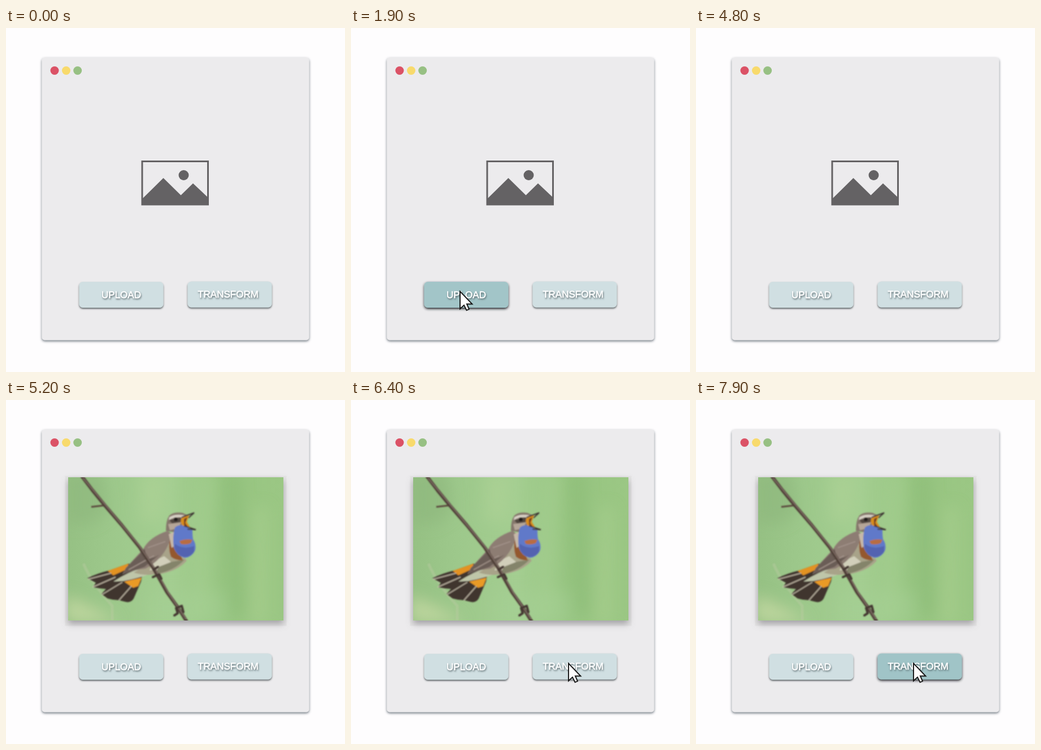
Animation of 600x610 px, one loop 8000 ms. Source, as an HTML page:

```html
<!DOCTYPE html>
<html lang="en">
<head>
<meta charset="utf-8">
<title>Upload and transform</title>
<style>
html, body { margin: 0; width: 100%; height: 100%; overflow: hidden; background: #fefdfe; }
svg { display: block; width: 100vw; height: 100vh; }
text { font: 17px "Liberation Sans", Arial, sans-serif; fill: #fff; stroke: #fff; stroke-width: .4; text-anchor: middle; }
</style>
</head>
<body>
<svg viewBox="0 0 600 610">
  <defs>
    <filter id="winShadow" x="-5%" y="-5%" width="110%" height="110%">
      <feDropShadow dx="0" dy="2" stdDeviation="2" flood-color="#667078" flood-opacity=".95"/>
    </filter>
    <filter id="btnShadow" x="-10%" y="-20%" width="120%" height="150%">
      <feDropShadow dx="0" dy="2" stdDeviation="1.7" flood-color="#50565c" flood-opacity=".9"/>
    </filter>
    <filter id="pressShadow" x="-10%" y="-20%" width="120%" height="150%">
      <feDropShadow dx="0" dy="2.2" stdDeviation="2" flood-color="#1c2226"/>
    </filter>
    <filter id="textShadow" x="-10%" y="-40%" width="120%" height="200%">
      <feDropShadow dx="1" dy="2" stdDeviation="1.5" flood-color="#46545a" flood-opacity=".9"/>
    </filter>
    <filter id="cardShadow" x="-10%" y="-10%" width="120%" height="120%">
      <feDropShadow dx="0" dy="6" stdDeviation="6" flood-color="#77757a" flood-opacity=".6"/>
    </filter>
    <filter id="soft" x="-60%" y="-30%" width="220%" height="160%"><feGaussianBlur stdDeviation="13"/></filter>
    <filter id="feather" x="-10%" y="-10%" width="120%" height="120%"><feGaussianBlur stdDeviation=".8"/></filter>
    <linearGradient id="meadow">
      <stop offset="0" stop-color="#96c184"/>
      <stop offset=".2" stop-color="#9dc88b"/>
      <stop offset=".48" stop-color="#a4ce91"/>
      <stop offset=".72" stop-color="#97c581"/>
      <stop offset="1" stop-color="#9bc784"/>
    </linearGradient>
    <clipPath id="frame"><rect x="110" y="137" width="381" height="254"/></clipPath>
  </defs>

  <rect width="600" height="610" fill="#fefdfe"/>
  <rect x="63.5" y="52.5" width="473" height="501" rx="5" fill="#ecebed" filter="url(#winShadow)"/>
  <circle cx="86" cy="75.5" r="7.5" fill="#db5266"/>
  <circle cx="106.5" cy="75.5" r="7.5" fill="#f8da6c"/>
  <circle cx="126.7" cy="75.5" r="7.5" fill="#97c083"/>

  <g fill="#646264">
    <rect x="241" y="236.5" width="116.5" height="76.5" fill="#ecebed" stroke="#646264" stroke-width="3"/>
    <circle cx="314.5" cy="261" r="9"/>
    <path d="M241 303L278.5 266L309.5 296.5L331 275.5L358 301V313H241z"/>
  </g>

  <g id="photo">
    <rect x="104.5" y="134.5" width="392" height="266" fill="#e1e0e2" opacity=".7"/>
    <rect x="110" y="137" width="381" height="254" fill="#a3ce8e" filter="url(#cardShadow)"/>
    <g clip-path="url(#frame)">
      <rect x="110" y="137" width="381" height="254" fill="url(#meadow)"/>
      <g filter="url(#soft)">
        <path d="M105 130h65l10 70l-30 20h-45z" fill="#8bb47a" opacity=".5"/>
        <path d="M235 130h50l-8 85h-40z" fill="#b2d497" opacity=".5"/>
        <path d="M345 130h22l-12 260h-22z" fill="#aed49c" opacity=".35"/>
        <path d="M390 130h24l8 250h-26z" fill="#86b671" opacity=".45"/>
        <path d="M440 190h24v210h-34z" fill="#aed193" opacity=".45"/>
        <path d="M250 340h140v60h-140z" fill="#a6cf93" opacity=".5"/>
        <path d="M105 345L160 370L200 395H105z" fill="#c2d7a2" opacity=".85"/>
      </g>
      <path d="M137 290Q152 325 188 365V391" fill="none" stroke="#b9cba1" stroke-width="5" opacity=".45" filter="url(#feather)"/>

      <g filter="url(#feather)">
        <path d="M144 316Q162 307 184 302L217 290L242 304L239 322L226 352Q221 360 212 358L200 355L189 354L180 352L169 344L177 335L166 334L154 332L159 324z" fill="#40342f"/>
        <path d="M180 303L217 290L214 300L190 311z" fill="#e39222"/>
        <path d="M209 322L240 315L234 330L225 333z" fill="#e99a27"/>
        <path d="M145 318L186 307M153 332L194 314M170 345L206 323M200 355L222 330" stroke="#d0c8b4" stroke-width="2" opacity=".8"/>
        <path d="M190 322Q214 306 250 293L270 303Q237 316 208 321z" fill="#bfc6a9"/>

        <path d="M282 236Q296 245 306 277Q322 281 319 286Q304 302 276 308Q246 313 226 306Q254 291 262 270z" fill="#a8a389"/>
        <path d="M262 285L280 277L292 287L274 301L254 302z" fill="#d1cfba"/>
        <path d="M270 296L293 287L316 283Q298 303 264 309z" fill="#84846a"/>
        <path d="M286 232Q254 243 243 264L212 298L206 309Q231 300 247 299Q275 284 287 257L297 240z" fill="#8d7d73"/>
        <path d="M246 264L212 298L207 309L245 296L272 274Q258 283 246 279z" fill="#6b5d56"/>
        <path d="M217 301L262 276M251 262L282 251" fill="none" stroke="#a5968c" stroke-width="1.5"/>
        <path d="M291 243Q286 262 292 278Q301 285 313 284L303 262z" fill="#94582f"/>
        <path d="M288 238L299 233L301 258L293 262z" fill="#c6b8a7"/>

        <path d="M283 232Q283 213 289 205Q297 198 312 200L321 204L315 223L302 235z" fill="#85776c"/>
        <path d="M289 208Q300 201 317 205L309 208Q298 207 288 213z" fill="#d9d2c7"/>
        <path d="M289 213L309 208L311 216L294 219z" fill="#51463f"/>
        <circle cx="300.5" cy="211.5" r="3.5" fill="#211d1d"/>
        <path d="M287 220L310 217L305 227L290 231z" fill="#b5a698"/>

        <path d="M299 226Q307 219 318 224L330 231Q330 241 331 247Q337 255 335 266Q329 279 316 280Q302 276 297 262Q294 242 299 226z" fill="#6079c9"/>
        <path d="M299 255Q313 266 333 259L333 269Q325 280 313 278Q300 272 298 260z" fill="#5263b0"/>
        <path d="M307 250Q319 245 330 248L327 254Q317 258 309 255z" fill="#b86d42"/>
        <path d="M312 208L324 204L320 216L326 226L313 223Q306 215 312 208z" fill="#d98d1f"/>
        <path d="M315 211L321 208L317 218L322 225L315 221z" fill="#713a20"/>
        <path d="M311 208L333 200L323 209M315 223L336 230L321 229" fill="none" stroke="#3c3433" stroke-width="2"/>
      </g>

      <g fill="none" stroke-linejoin="round" filter="url(#feather)">
        <path d="M151 189.5L173 187" stroke="#5b493d" stroke-width="3"/>
        <path d="M134 135L153 160L175 187L205 222L237 262L262 300L285 341L303 366L320 393" stroke="#4f3f38" stroke-width="6"/>
        <path d="M136 138L175 185L237 260L264 300L286 340L319 389" stroke="#85736a" stroke-width="1.5"/>
        <path d="M261 301L269 296M260 314L271 309L275 317M298 382L304 378L301 369L311 365L314 376" stroke="#453833" stroke-width="4" stroke-linecap="round"/>
      </g>
    </g>
  </g>

  <g id="upload">
    <rect x="129.5" y="450" width="149" height="46" rx="6.5"/>
    <text x="204" y="479" filter="url(#textShadow)">UPLOAD</text>
  </g>
  <g id="transform">
    <rect x="321.5" y="449.5" width="149" height="46" rx="6.5"/>
    <text x="393" y="478" filter="url(#textShadow)">TRANSFORM</text>
  </g>

  <path id="cursor" d="M0 0V31L7 24.5L11.5 33.5L16 31.5L12 22.5H21.5z" fill="#fefefe" stroke="#161616" stroke-width="1.9"/>
</svg>

<script>
const LOOP = 8000, STEP = 100;
const LIGHT = [208, 223, 226], DARK = [160, 196, 199];
const el = id => document.getElementById(id);
const photo = el('photo'), cursor = el('cursor');
const uploadFace = el('upload').firstElementChild;
const transformFace = el('transform').firstElementChild;

const mix = (a, b, k) => a + (b - a) * k;
const ramp = (t, from, to) => Math.min(1, Math.max(0, (t - from) / (to - from)));

function paint(face, k) {
  face.setAttribute('fill', `rgb(${LIGHT.map((c, i) => Math.round(mix(c, DARK[i], k)))})`);
  face.setAttribute('filter', k ? 'url(#pressShadow)' : 'url(#btnShadow)');
}

// Pressing settles on the second step; release is immediate.
function press(t, down, up) {
  return t < down || t >= up ? 0 : t < down + STEP ? 0.95 : 1;
}

function placeCursor(t, start, x, fromY) {
  const k = ramp(t, start, start + 300);
  cursor.setAttribute('transform', `translate(${mix(x + 5, x, k)} ${mix(fromY, 467, k)})`);
}

function draw(t) {
  paint(uploadFace, press(t, 1900, 2900));
  paint(transformFace, press(t, 7300, LOOP));
  photo.setAttribute('opacity', ramp(t, 4900, 5200));

  const second = t >= 6100;
  if (second) placeCursor(t, 6100, 385, 580);
  else placeCursor(t, 700, 193, 565);
  const shown = second ? 1 : t < 700 ? 0 : 1 - ramp(t, 4000, 4500);
  cursor.setAttribute('opacity', shown);
}

const begin = performance.now();
function tick() {
  const t = (performance.now() - begin) % LOOP;
  draw(Math.floor(t / STEP) * STEP);
  requestAnimationFrame(tick);
}
draw(0);
requestAnimationFrame(tick);
</script>
</body>
</html>
```
